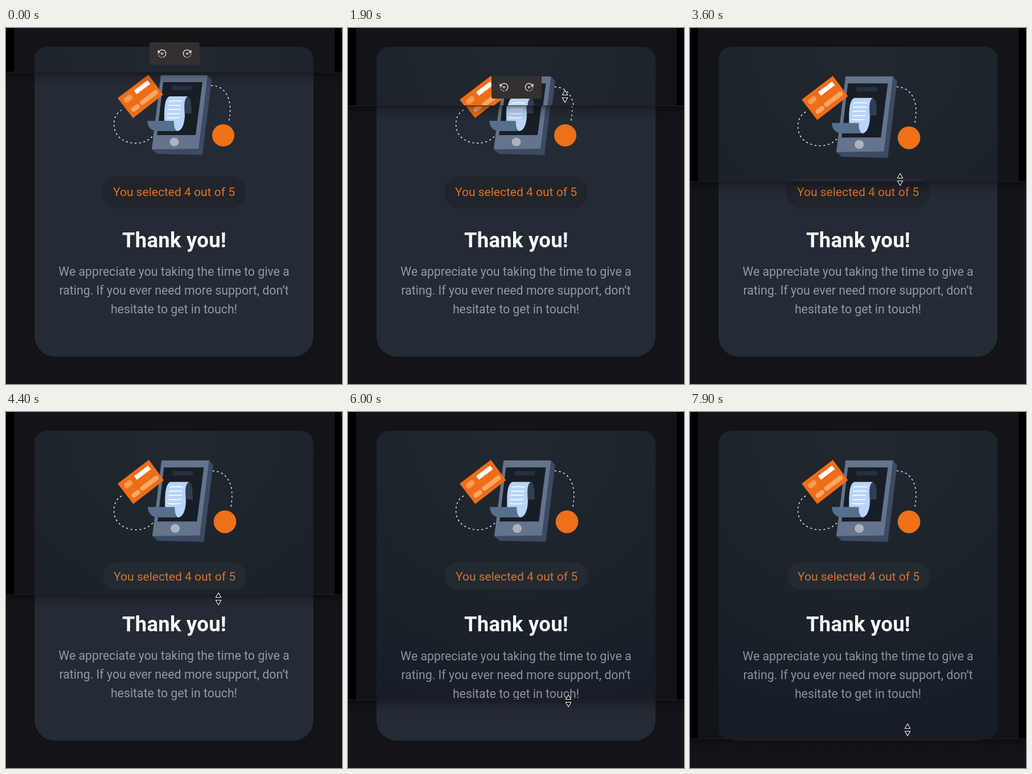
Write an HTML page that moves like this. It is 590 by 625 pixels and loops after 8 s.

```html
<!DOCTYPE html>
<html lang="en">
<head>
<meta charset="utf-8">
<title>Rating card comparison</title>
<style>
  html, body { margin: 0; width: 100%; height: 100%; overflow: hidden; background: #121417; }
  svg { display: block; width: 590px; height: 625px; }
  text { font-family: Roboto, "Open Sans", sans-serif; text-anchor: middle; }
  .pick { font-size: 21px; fill: #e8701a; }
  .title { font-size: 36.4px; font-weight: 700; letter-spacing: .3px; fill: #fff; }
  .note { font-size: 21.3px; fill: #9099a7; }
  #design .pick { fill: #dc7027; }
  #design .title { fill: #fbfbf8; }
  #design .note { fill: #8b929c; }
</style>
</head>
<body>
<svg viewBox="0 0 590 625">
  <defs>
    <radialGradient id="glow" gradientUnits="userSpaceOnUse" cx="295" cy="33" r="545">
      <stop offset="0" stop-color="#212930"/>
      <stop offset="1" stop-color="#171d26"/>
    </radialGradient>
    <linearGradient id="fade" x2="0" y2="1">
      <stop offset="0" stop-color="#000" stop-opacity=".38"/>
      <stop offset=".4" stop-color="#000" stop-opacity=".13"/>
      <stop offset="1" stop-color="#000" stop-opacity="0"/>
    </linearGradient>
    <clipPath id="above"><rect id="cut" width="590"/></clipPath>

    <g id="art">
      <g fill="none" stroke="#f2f4f6" stroke-width="1.4" stroke-dasharray="3.2 4.5">
        <path d="M203 144C188 152 187 172 193 184C204 206 245 210 260 186"/>
        <path d="M360 101C385 101 400 125 391 166"/>
      </g>
      <path fill="#3c4a62" d="M272 83H354L361 91L345 223L265 221L256 213Z"/>
      <path fill="#64748c" d="M272 83H354L338 212L256 213Z"/>
      <path fill="#181e26" d="M276 95H345L333 188H265Z"/>
      <path fill="#262e41" d="M291 101H326V109H291Z"/>
      <ellipse cx="295.5" cy="200" rx="8" ry="7.5" fill="#abb4be"/>
      <path fill="#323d51" d="M318 120C327 121 325 139 326 150H314C312 138 311 124 318 120Z"/>
      <path fill="#b9d4f7" d="M287 120H319C312 124 313 139 314 151C314 166 310 181 300 181C293 181 290 172 278 164C278 148 277 124 287 120Z"/>
      <g id="lines" fill="none" stroke="#fff" stroke-width="1.5"></g>
      <path fill="#566f8c" d="M248 163H295C294 172 297 181 302 181H266C255 181 249 174 248 163Z"/>
      <path fill="#ee6d18" d="M196 123L250 82L276 117L223 158Z"/>
      <path stroke="#fff" stroke-width="8" d="M227 113L251 95"/>
      <path stroke="#f7a866" stroke-width="8" stroke-linecap="round" d="M239 131L263 113M224 143L231 138"/>
      <g fill="#f7a866" fill-opacity=".75">
        <circle cx="212" cy="126" r="5"/><circle cx="217" cy="122" r="5"/>
      </g>
      <circle cx="381.5" cy="188.5" r="19.5" fill="#ee7019"/>
    </g>

    <g id="turn" fill="none" stroke="#f4f4f4" stroke-width="1.2">
      <path d="M-5.5 -3.5A6.6 6.6 0 1 1 3.5 5.6"/>
      <path stroke-dasharray="2 2" d="M3.5 5.6A6.6 6.6 0 0 1 -6.5 -1"/>
      <circle r="1.5"/>
      <path fill="#f4f4f4" stroke="none" d="M-7.5 -6.5V-1.5H-2.5Z"/>
    </g>
  </defs>

  <g id="page">
    <rect width="590" height="625" fill="#121417"/>
    <rect x="50" y="33" width="490" height="544" rx="36" fill="#252b34"/>
    <use href="#art"/>
    <rect x="169" y="260" width="252" height="57" rx="28.5" fill="#20252b"/>
  </g>

  <g id="design" clip-path="url(#above)">
    <rect width="590" height="625"/>
    <rect x="14" width="563" height="625" fill="#131417"/>
    <rect x="50" y="33" width="490" height="542" rx="22" fill="url(#glow)"/>
    <use href="#art" transform="matrix(1.016 0 0 1.021 -3.1 .28)"/>
    <rect x="170" y="264" width="252" height="48" rx="24" fill="#232a32"/>
  </g>

  <g id="edge">
    <rect width="590" height="26" fill="url(#fade)"/>
    <rect width="590" height="1" fill="#1e2125"/>
    <g id="tools">
      <rect x="252" y="-52" width="88" height="40" rx="3" fill="#33302f"/>
      <use href="#turn" x="274" y="-32"/>
      <use href="#turn" transform="translate(318 -32) scale(-1 1)"/>
    </g>
  </g>

  <path id="cursor" fill="#000" stroke="#fff" stroke-width="1.1" d="M0 -10.5L4.5 -2.5H-4.5ZM0 10.5L4.5 2.5H-4.5Z"/>
</svg>
<script>
const LOOP = 8000, STEP = 100, ENTER = 700, GRAB = 1500, DRAG = 2000;
const $ = id => document.getElementById(id);

// The drag: divider height, pointer x, pointer offset from the divider
const drag = [
  { t: 200, y: 77, x: 381, off: -16 },
  { t: 500, y: 136, x: 381, off: -16 },
  { t: 1900, y: 136, x: 381, off: -16 },
  { t: 2200, y: 88, x: 380, off: -8 },
  { t: 2700, y: 162, x: 377, off: -8 },
  { t: 3600, y: 269, x: 369, off: -3 },
  { t: 4000, y: 270, x: 369, off: 0 },
  { t: 5200, y: 419, x: 382, off: 24 },
  { t: 6000, y: 505, x: 387, off: 2 },
  { t: 7500, y: 598, x: 383, off: -8 },
  { t: 7900, y: 573, x: 382, off: -15 }
];

function pose(t) {
  const i = drag.findIndex(k => k.t > t);
  if (i < 1) return i ? drag[drag.length - 1] : drag[0];
  const a = drag[i - 1], b = drag[i], p = (t - a.t) / (b.t - a.t);
  const mix = key => a[key] + (b[key] - a[key]) * p;
  return { y: mix("y"), x: mix("x"), off: mix("off") };
}

function add(parent, tag, attrs, words = "") {
  const el = document.createElementNS("http://www.w3.org/2000/svg", tag);
  for (const name in attrs) el.setAttribute(name, attrs[name]);
  el.textContent = words;
  parent.append(el);
}

function addCopy(parent, shift) {
  const put = (kind, x, y, words) => add(parent, "text", { class: kind, x, y }, words);
  put("pick", 295 + shift, 294.5 + shift, "You selected 4 out of 5");
  put("title", 295.5, 385, "Thank you!");
  ["We appreciate you taking the time to give a",
   "rating. If you ever need more support, don’t",
   "hesitate to get in touch!"
  ].forEach((line, i) => put("note", 295, 435 + shift + 33 * i, line));
}

function draw(t) {
  const { x, y, off } = pose(t);
  const edge = Math.round(y);
  $("cut").setAttribute("height", edge);
  $("edge").setAttribute("transform", `translate(0 ${edge})`);
  $("tools").style.display = t < DRAG ? "" : "none";

  // The pointer glides in from the right before it grabs the divider
  const far = Math.max(0, (GRAB - t) / (GRAB - ENTER)) ** 3;
  const cx = Math.round(x + 147 * far), cy = Math.round(y + off + 47 * far);
  $("cursor").setAttribute("transform", `translate(${cx} ${cy})`);
  $("cursor").style.display = t < ENTER ? "none" : "";
}

for (let i = 0; i < 5; i++) {
  add($("lines"), "path", { d: `M${286 - i} ${129 + 7 * i}q12 ${i - 2} 23 0` });
}
addCopy($("page"), 0);
addCopy($("design"), 1);

const start = performance.now();
function tick() {
  const t = (performance.now() - start) % LOOP;
  draw(Math.floor(t / STEP) * STEP);
  requestAnimationFrame(tick);
}
draw(0);
requestAnimationFrame(tick);
</script>
</body>
</html>
```
